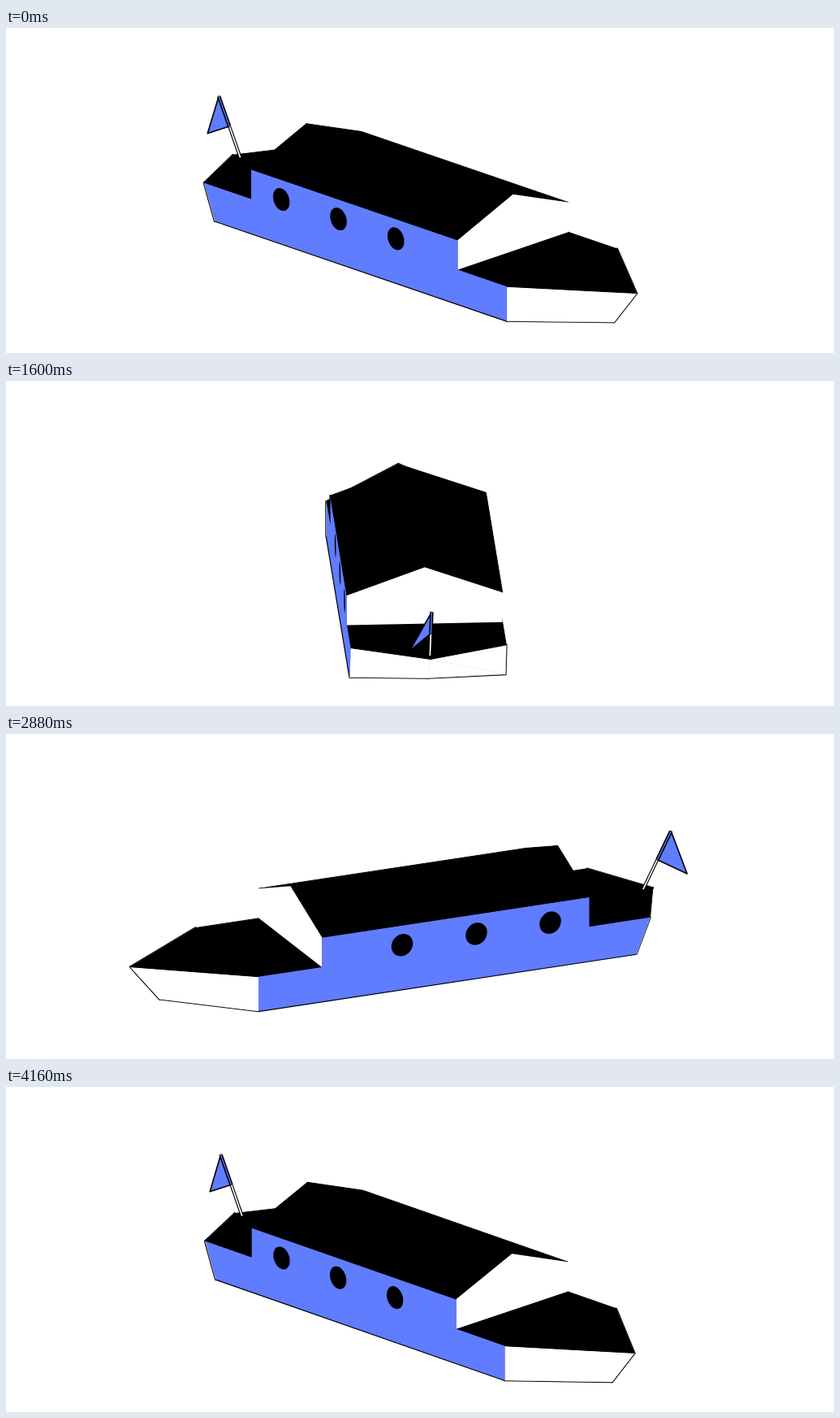
These frames come from a looping animation (1020 px wide and 400 px high, 4200 ms). An HTML page with a canvas:

```html
<!DOCTYPE html>
<html lang="en">
<head>
<meta charset="utf-8">
<title>Turning boat</title>
<style>
  html, body { margin: 0; width: 100%; height: 100%; overflow: hidden; background: #fff; }
  canvas { display: block; }
</style>
</head>
<body>
<canvas id="stage" width="1020" height="400"></canvas>
<script>
const ctx = document.getElementById('stage').getContext('2d');
const BLUE = '#607cff', BLACK = '#000', WHITE = '#fff';
const RAD = Math.PI / 180;
const LOOP = 4200, STEP = 40, DEGREES_PER_MS = 0.0864;
const TILT_SIN = Math.sin(20 * RAD), TILT_COS = Math.cos(20 * RAD);

// Model axes: x towards the bow, y up, z to starboard; the deck is y = 0.
const HALF = 96, BOTTOM = -45, KEEL = -48, EAVE = 39, RIDGE = 74;
const SHOULDER = 254.5, STERN = -273, CABIN_BACK = -191, CABIN_FRONT = 169;
const bowTip = [384.5, 0, 0], bowKeel = [345, KEEL, 0];
const sternTip = [-319, 0, 0], sternKeel = [-SHOULDER, KEEL, 0];

let cos, sin;

function project([x, y, z]) {
  return [505 + x * cos - z * sin,
          233.5 + (x * sin + z * cos) * TILT_SIN - y * TILT_COS];
}

function trace(points, closed = true) {
  ctx.beginPath();
  points.forEach(p => ctx.lineTo(...project(p)));
  if (closed) ctx.closePath();
}

function fill(points, color) {
  trace(points);
  ctx.fillStyle = color;
  ctx.fill();
}

function stroke(points, width, color = BLACK, closed = true) {
  trace(points, closed);
  ctx.lineWidth = width;
  ctx.strokeStyle = color;
  ctx.stroke();
}

function solid(points, color, width, lineColor = BLACK) {
  fill(points, color);
  stroke(points, width, lineColor);
}

function flankOutline(z) {
  return [
    [STERN, 0, z], [CABIN_BACK, 0, z], [CABIN_BACK, EAVE, z], [CABIN_FRONT, EAVE, z],
    [CABIN_FRONT, 0, z], [SHOULDER, 0, z], [SHOULDER, BOTTOM, z], [-SHOULDER, BOTTOM, z]
  ];
}

function drawHull(near) {
  const panels = [];
  for (const side of [-near, near]) {
    const z = side * HALF;
    const deck = [STERN, 0, z], low = [-SHOULDER, BOTTOM, z];
    panels.push([[SHOULDER, 0, z], bowTip, bowKeel, [SHOULDER, BOTTOM, z]]);
    if (side > 0) {
      panels.push([deck, sternTip, low], [sternTip, sternKeel, low]);
    } else {
      const open = [deck, sternTip, sternKeel, low];
      open.open = true;
      panels.push(open);
    }
  }

  // Strokes go under the fills, so that only the outer contour stays.
  panels.forEach(p => stroke(p.open ? p.slice(1) : p, 2.6, BLACK, !p.open));
  stroke(flankOutline(near * HALF), 2.4);
  panels.forEach(p => solid(p, WHITE, 0.6, WHITE));

  solid([[STERN, 0, -HALF], sternTip, [STERN, 0, HALF],
         [SHOULDER, 0, HALF], bowTip, [SHOULDER, 0, -HALF]], BLACK, 1);
}

function drawFlank(near) {
  const z = near * HALF;
  fill(flankOutline(z), BLUE);
  for (const x of [-138.5, -39, 61]) {
    const rim = Array.from({ length: 32 }, (_, i) => {
      const a = i * Math.PI / 16;
      return [x + 14.5 * Math.cos(a), 13 + 14.5 * Math.sin(a), z];
    });
    fill(rim, BLACK);
  }
}

function drawCabin(near) {
  const wall = x => [[x, 0, HALF], [x, EAVE, HALF], [x, RIDGE, 0],
                     [x, EAVE, -HALF], [x, 0, -HALF]];
  for (const side of [-near, near]) {
    solid([[CABIN_BACK, EAVE, side * HALF], [CABIN_BACK, RIDGE, 0],
           [CABIN_FRONT, RIDGE, 0], [CABIN_FRONT, EAVE, side * HALF]], BLACK, 1);
  }
  const face = wall(sin > 0 ? CABIN_FRONT : CABIN_BACK);
  fill(face, WHITE);
  if (sin < 0 && (cos > 0 || cos < -0.8)) stroke(face, 1.5);
}

function drawFlag(time) {
  const foot = [-306, 0, 0], bottom = [-325, 36, 0], top = [-343.5, 70.7, 0];
  const swing = Math.sin(time / LOOP * Math.PI) ** 1.2;
  const angle = (2 - 49 * swing) * RAD;
  const out = 41 * Math.cos(angle);
  const point = [-325.5 - 0.882 * out, 37 - 0.47 * out, 41 * Math.sin(angle)];

  stroke([foot, bottom], 4, BLACK, false);
  stroke([foot, bottom], 1.7, WHITE, false);
  solid([top, point, bottom], BLUE, 1.6);
  stroke([bottom, top], 4.5, BLACK, false);
  stroke([bottom, top], 1.3, BLUE, false);
}

function draw(time) {
  const heading = (45 - DEGREES_PER_MS * time) * RAD;
  cos = Math.cos(heading);
  sin = Math.sin(heading);
  const near = cos > 0 ? 1 : -1;

  ctx.fillStyle = WHITE;
  ctx.fillRect(0, 0, 1020, 400);
  ctx.lineJoin = 'round';
  drawHull(near);
  if (sin > 0) drawFlag(time);
  drawFlank(near);
  drawCabin(near);
  if (sin <= 0) drawFlag(time);
}

function tick() {
  draw(Math.floor(performance.now() % LOOP / STEP) * STEP);
  requestAnimationFrame(tick);
}
tick();
</script>
</body>
</html>
```
